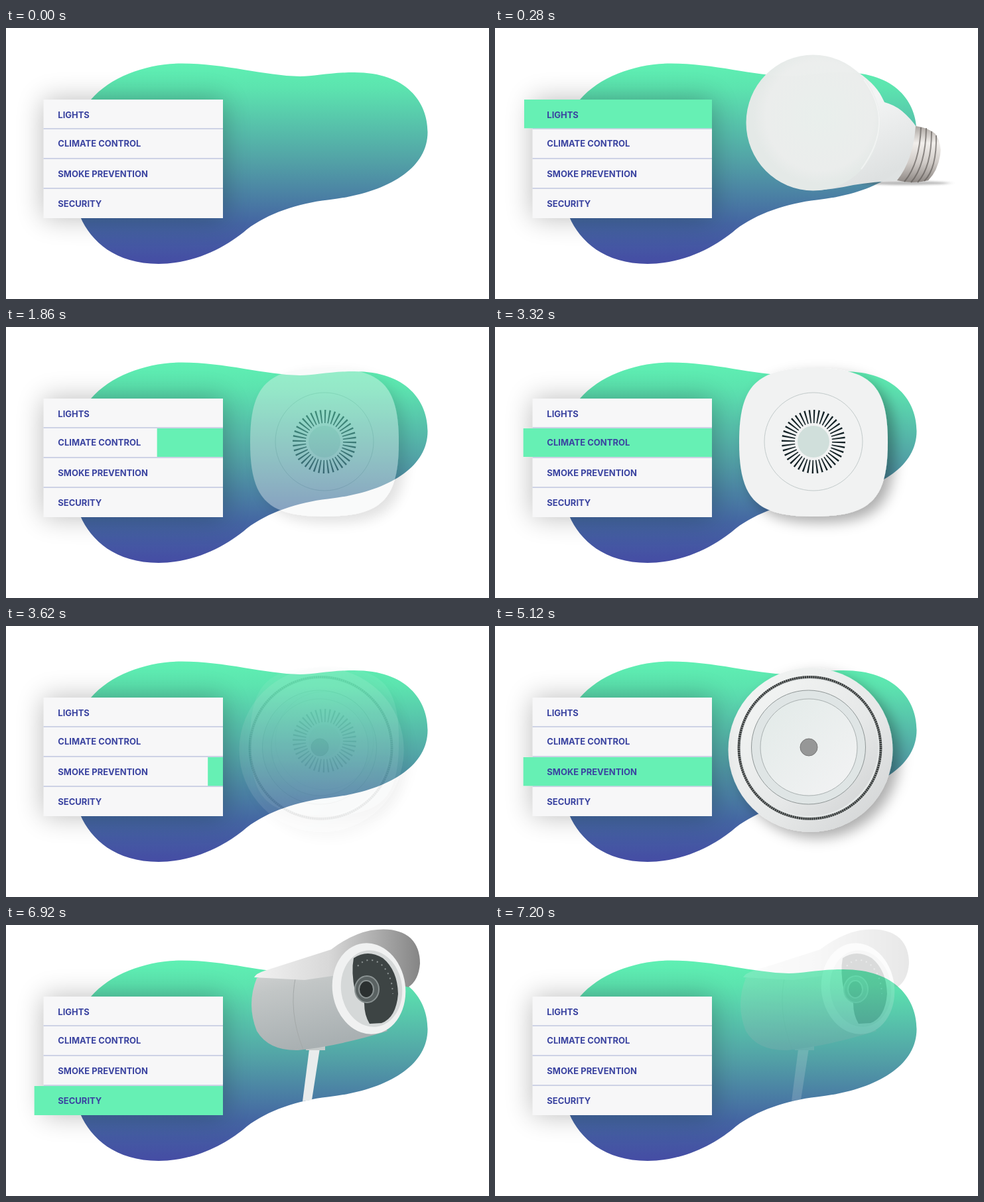
Recreate the animation shown at these times as an HTML page. Size 728 by 409 pixels, loop 7.22 s.

```html
<!DOCTYPE html>
<html lang="en">
<head>
<meta charset="utf-8">
<title>Smart home menu</title>
<style>
html, body { margin: 0; width: 100%; height: 100%; overflow: hidden; background: #fff; }
svg { display: block; width: 728px; height: 409px; }
text { font: 700 13px Inter, Roboto, sans-serif; fill: #3a43a0; }
.device { opacity: 0; }
</style>
</head>
<body>
<svg viewBox="0 0 728 409">
  <defs>
    <linearGradient id="blob" x2="0" y2="1">
      <stop stop-color="#5ff0b3"/><stop offset=".12" stop-color="#5ce4af"/>
      <stop offset=".5" stop-color="#529fa6"/><stop offset=".8" stop-color="#4465a2"/>
      <stop offset="1" stop-color="#454ca4"/>
    </linearGradient>
    <radialGradient id="glass" cx=".55" cy=".45">
      <stop stop-color="#eaf0ed"/><stop offset=".8" stop-color="#eceeed"/>
      <stop offset="1" stop-color="#e5eae8"/>
    </radialGradient>
    <linearGradient id="neck" x2=".4" y2="1">
      <stop stop-color="#e4e9e7"/><stop offset=".4" stop-color="#f5f6f6"/><stop offset="1" stop-color="#dfe2e2"/>
    </linearGradient>
    <linearGradient id="metal" x2="0" y2="1">
      <stop stop-color="#aaa49f"/><stop offset=".3" stop-color="#f2efec"/>
      <stop offset=".65" stop-color="#d0cbc7"/><stop offset="1" stop-color="#8d8783"/>
    </linearGradient>
    <linearGradient id="plate" x2="1" y2="1">
      <stop stop-color="#f4f6f5"/><stop offset=".6" stop-color="#e6e8e8"/><stop offset="1" stop-color="#cfd1d2"/>
    </linearGradient>
    <linearGradient id="disc" x2="1" y2="1">
      <stop stop-color="#e2eae8"/><stop offset="1" stop-color="#f3f3f4"/>
    </linearGradient>
    <linearGradient id="hood">
      <stop stop-color="#f2f2f2"/><stop offset=".45" stop-color="#d8d8d8"/><stop offset="1" stop-color="#858585"/>
    </linearGradient>
    <linearGradient id="body" x2=".3" y2="1">
      <stop stop-color="#dcdcdc"/><stop offset=".4" stop-color="#c2c6c6"/><stop offset="1" stop-color="#a9b0b2"/>
    </linearGradient>
    <filter id="soft" x="-50%" y="-50%" width="200%" height="200%"><feGaussianBlur stdDeviation="21"/></filter>
    <filter id="haze" x="-30%" y="-150%" width="160%" height="400%"><feGaussianBlur stdDeviation="6 1.5"/></filter>
    <filter id="drop" x="-20%" y="-20%" width="150%" height="150%">
      <feDropShadow dx="10" dy="9" stdDeviation="10" flood-opacity=".32"/>
    </filter>
  </defs>

  <path fill="url(#blob)" d="M128 108C159 72 214 53.5 265 53.5C330 53.5 390 72 443 73C465 73 490 67 525 67C604 67 635.5 112 635.5 157C635.5 215 570 250 485 259.5C440 264.5 394 280 363 304C333 330 285 356 230 356C165 356 128 322 112 285C96 240 96 150 128 108Z"/>

  <!-- light bulb -->
  <g class="device">
    <ellipse cx="618" cy="234" rx="66" ry="3" fill="#555" opacity=".4" filter="url(#haze)"/>
    <path fill="url(#neck)" d="M540 62Q572 82 583 104L587 112Q602 116 613 125Q626 136 635 149V200L609 230Q570 232 540 237Q500 246 470 245Z"/>
    <path fill="url(#metal)" d="M634 148Q652 150 664 160Q674 176 671 192Q667 216 653 230Q630 236 606 230Q630 200 634 148Z"/>
    <path fill="none" stroke="#5f5a56" stroke-width="2" opacity=".65" d="M642 150Q640 205 617 232M650 151Q649 208 627 233M658 156Q658 210 637 233M665 162Q666 212 647 231"/>
    <ellipse cx="479.5" cy="143" rx="101" ry="102.5" fill="url(#glass)"/>
    <path fill="none" stroke="#fafbfb" stroke-width="2" opacity=".6" d="M556 78Q604 143 552 213"/>
  </g>

  <!-- thermostat -->
  <g class="device">
    <path filter="url(#drop)" fill="#f1f2f2" d="M480 62C566 62 592 88 592 174C592 260 566 286 480 286C394 286 368 260 368 174C368 88 394 62 480 62Z"/>
    <circle cx="480" cy="173" r="74" fill="none" stroke="#c2caca"/>
    <circle cx="480" cy="173" r="38" fill="none" stroke="#142226" stroke-width="20" pathLength="120" stroke-dasharray="1 2"/>
    <circle cx="480" cy="173" r="24" fill="#d0dfdb"/>
  </g>

  <!-- smoke detector -->
  <g class="device">
    <circle cx="475.5" cy="187" r="124" fill="url(#plate)" filter="url(#drop)"/>
    <circle cx="474.5" cy="184" r="107" fill="#e5e8e8" stroke="#8d9191" stroke-width="4"/>
    <circle cx="474.5" cy="184" r="107" fill="none" stroke="#343838" stroke-width="3.5" stroke-dasharray="2 1.2"/>
    <circle cx="474" cy="183.5" r="103" fill="url(#plate)"/>
    <circle cx="472.5" cy="183" r="86" fill="#dfe5e5" stroke="#8f9696"/>
    <circle cx="473" cy="183" r="73" fill="url(#disc)" stroke="#a9b0b0"/>
    <circle cx="473" cy="183" r="13" fill="#969797" stroke="#777"/>
  </g>

  <!-- camera -->
  <g class="device">
    <path fill="#e9ecec" d="M458 180H474L461 264L447 266Z"/>
    <path fill="#c5caca" d="M452 176H481V189H452Z"/>
    <path fill="url(#body)" d="M378 80L510 42L575 160Q500 183 440 189Q396 190 378 160Q362 120 378 80Z"/>
    <path fill="none" stroke="#a4a9a9" d="M437 76Q425 130 448 188"/>
    <path fill="url(#hood)" d="M374 79Q377 73 390 69L490 37Q520 14 550 8Q590 2 610 20Q624 34 624 58Q622 84 606 94L540 70L450 83Z"/>
    <ellipse cx="547" cy="96" rx="55" ry="69" fill="#f0f1f1" transform="rotate(-8 547 96)"/>
    <ellipse cx="551" cy="96" rx="46" ry="58" fill="#d5d8d8" transform="rotate(-8 551 96)"/>
    <path fill="#3d4444" d="M524 50Q545 36 568 50Q590 68 591 104Q588 140 566 148L548 149Q540 136 540 118L526 100Q520 70 524 50Z"/>
    <g stroke="#8a9292" stroke-width="2">
      <ellipse cx="544" cy="97" rx="18" ry="20" fill="#5a6262"/>
      <ellipse cx="543" cy="97" rx="11" ry="13" fill="#2b3030"/>
    </g>
    <path fill="none" stroke="#8f9696" stroke-width="2" stroke-dasharray="2 6" d="M530 62Q545 46 564 58Q582 74 583 104"/>
  </g>

  <rect x="56.5" y="108" width="270.5" height="179" opacity=".27" filter="url(#soft)"/>
  <rect x="56.5" y="108" width="270.5" height="179" fill="#f7f7f8"/>
  <path stroke="#c0c6e0" stroke-width="1.5" d="M56.5 152H327M56.5 197H327M56.5 242H327"/>
  <g fill="#66f0b4">
    <rect class="bar" y="108" height="43.3"/>
    <rect class="bar" y="153" height="43"/>
    <rect class="bar" y="198" height="43.3"/>
    <rect class="bar" y="243" height="44"/>
  </g>
  <text x="78.3" y="135.6">LIGHTS</text>
  <text x="78.3" y="179.2">CLIMATE CONTROL</text>
  <text x="78.3" y="224.8">SMOKE PREVENTION</text>
  <text x="78.3" y="269.6">SECURITY</text>
</svg>
<script>
const LOOP = 7220, STEP = 1800, FADE = 300, RIGHT = 327, WIDTH = 285;
const bars = document.querySelectorAll('.bar');
const devices = document.querySelectorAll('.device');

// cubic-bezier(.25, .1, .25, 1)
function ease(x) {
  if (x <= 0) return 0;
  if (x >= 1) return 1;
  const curve = (a, b, u) => 3 * a * u * (1 - u) ** 2 + 3 * b * u * u * (1 - u) + u ** 3;
  let lo = 0, hi = 1;
  for (let i = 0; i < 24; i++) {
    const mid = (lo + hi) / 2;
    if (curve(.25, .25, mid) < x) lo = mid; else hi = mid;
  }
  return curve(.1, 1, lo);
}

// eased in from start, the same curve played backwards until end
const pulse = (t, start, end) => ease(Math.min(t - start, end - t) / FADE);

function draw(now) {
  const t = now % LOOP;
  bars.forEach((bar, i) => {
    const start = i ? i * STEP - 7 : 13, end = (i + 1) * STEP;
    const w = WIDTH * pulse(t, start, end);
    bar.setAttribute('x', RIGHT - w);
    bar.setAttribute('width', w);
    devices[i].style.opacity = pulse(t, start - 4, end + 45);
  });
}

let begin;
function tick(now) {
  begin ??= now;
  draw(now - begin);
  requestAnimationFrame(tick);
}
draw(0);
requestAnimationFrame(tick);
</script>
</body>
</html>
```
